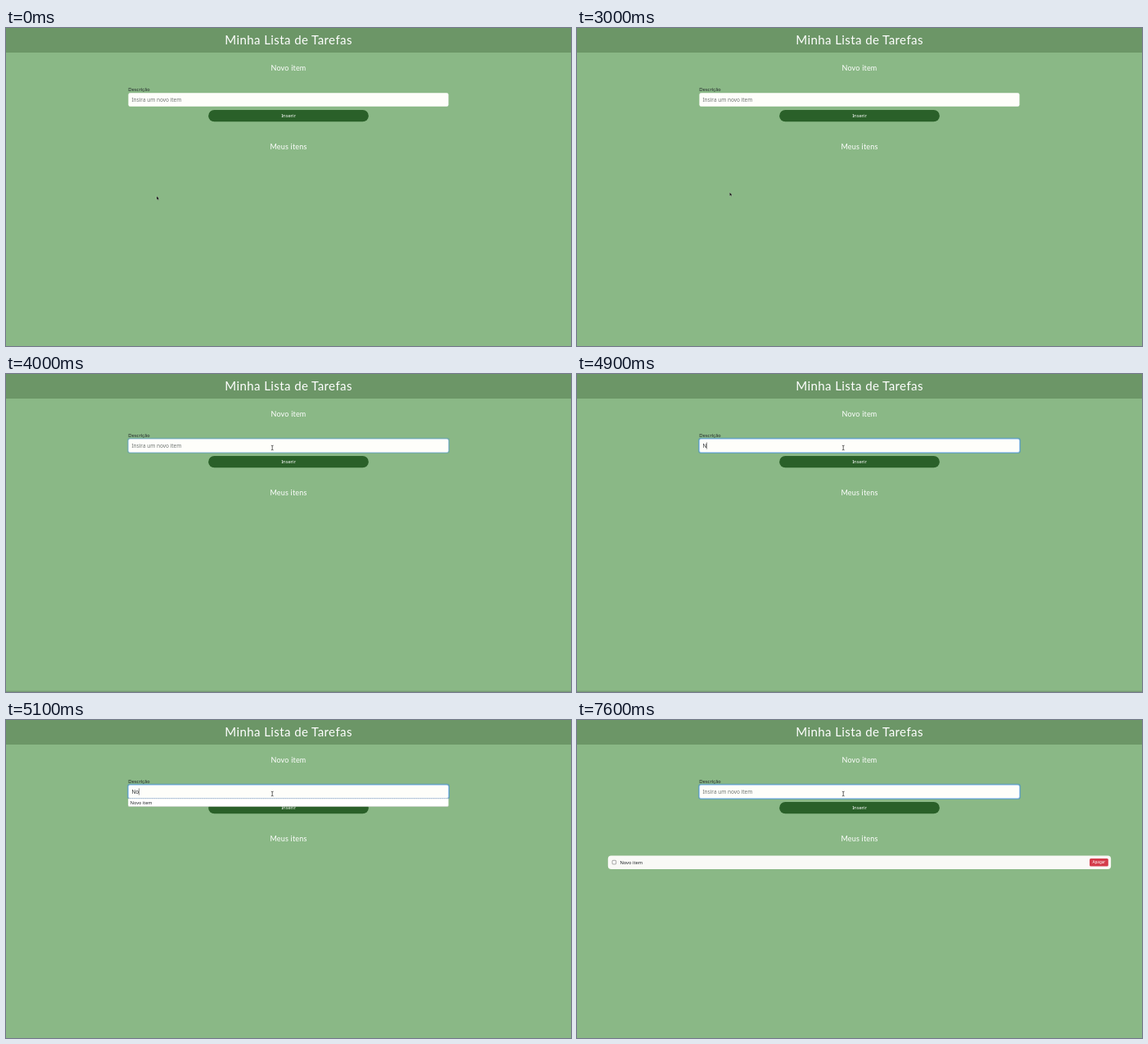
Animation, 690 px wide and 388 px high, one loop 8 s. Source, as an HTML page:

```html
<!DOCTYPE html>
<html lang="pt-BR">
<head>
<meta charset="utf-8">
<title>Minha Lista de Tarefas</title>
<style>
  html, body { margin: 0; width: 100%; height: 100%; overflow: hidden; background: #8ab886; }
  svg { display: block; width: 100%; height: 100%; }
  text { font: 6.47px "Noto Sans", "Open Sans", sans-serif; fill: #212529; }
  .head { font-family: Raleway, Lato, sans-serif; fill: #fff; text-anchor: middle; }
  .title { font-size: 15px; letter-spacing: .42px; }
  .sub { font-size: 9px; letter-spacing: .2px; }
  .label { font: 5.75px Raleway, Lato, sans-serif; letter-spacing: .15px; }
  .body { font-size: 5.75px; }
  .mid { text-anchor: middle; fill: #fff; }
  .hint { fill: #6f7573; }
  .drop { font-size: 5.5px; }
  .small { font-size: 4.6px; }
</style>
</head>
<body>
<svg viewBox="0 0 690 388" preserveAspectRatio="none">
  <rect width="690" height="388" fill="#8ab886"/>
  <rect width="690" height="30" fill="#6c9667"/>
  <text class="head title" x="345" y="20.3">Minha Lista de Tarefas</text>
  <text class="head sub" x="345" y="51.6">Novo item</text>
  <text class="label" x="149.3" y="76.9">Descrição</text>

  <rect id="glow" x="148" y="77.8" width="394" height="19.2" rx="3.4" fill="#0d6efd" fill-opacity=".3"/>
  <rect x="149.4" y="79.2" width="391" height="16.5" rx="2.2" fill="#fefefa"/>
  <rect id="ring" x="149.4" y="79.2" width="391" height="16.5" rx="2.2" fill="none" stroke="#86b7fe" stroke-width=".6"/>
  <text id="hint" class="hint" x="153.4" y="89.7">Insira um novo item</text>
  <text id="typed" x="153.4" y="89.7" xml:space="preserve"></text>
  <rect id="caret" y="83.4" width=".5" height="8.2" fill="#222"/>

  <rect x="247.2" y="100" width="195.6" height="14.3" rx="7.15" fill="#2a6029"/>
  <text class="body mid" x="345" y="109.3">Inserir</text>
  <text class="head sub" x="345" y="148">Meus itens</text>

  <g id="drop">
    <path d="M149.2 95.7H540.4V104.2Q540.4 105.7 538.9 105.7H150.7Q149.2 105.7 149.2 104.2Z" fill="#fff"/>
    <path d="M149.2 95.8H540.4" stroke="#8d8d8d" stroke-width=".5" stroke-dasharray="1 .6"/>
    <path d="M149.4 104.2Q149.4 105.6 150.7 105.6H538.9Q540.2 105.6 540.2 104.2" fill="none" stroke="#9aa39a" stroke-width=".35"/>
    <text class="drop" x="151.8" y="102.7">Novo item</text>
  </g>

  <g id="item">
    <rect x="37.8" y="165.4" width="614.3" height="16.7" rx="4" fill="#f9f9f6"/>
    <rect x="43.1" y="171.3" width="4.6" height="4.6" rx=".8" fill="#fff" stroke="#6b6b6b" stroke-width=".6"/>
    <text class="body" x="52.4" y="175.8">Novo item</text>
    <rect x="626" y="169" width="22.8" height="9.6" rx="1.5" fill="#d43c4b"/>
    <text class="small mid" x="637.4" y="175.4">Apagar</text>
  </g>

  <rect id="edge" y="386.6" width="690" height="1.4" fill="#789a75"/>

  <path id="arrow" d="M0 0V4.6L1.1 3.7L1.8 5.2L2.6 4.9L1.9 3.4H3.2Z" fill="#111" stroke="#e6eee2" stroke-width=".25"/>
  <path id="beam" d="M-1.4 -2.8Q0 -2.8 0 -2V2Q0 2.8 -1.4 2.8M1.4 -2.8Q0 -2.8 0 -2M0 2Q0 2.8 1.4 2.8" fill="none" stroke="#222" stroke-width=".7"/>
</svg>
<script>
  const LOOP = 8000, TICK = 100;
  const el = id => document.getElementById(id);
  const show = (id, on) => el(id).setAttribute("visibility", on ? "visible" : "hidden");

  // [time, x, y] of the pointer
  const moves = [
    [0, 184, 205], [3000, 186.4, 200.4], [3100, 198, 182], [3200, 226, 150],
    [3300, 262, 123], [3400, 286.8, 105.8], [3500, 302, 98], [3600, 314, 93],
    [3700, 322, 91], [3800, 325.2, 90]
  ];
  // [time, text in the field]
  const typing = [
    [0, ""], [4900, "N"], [5000, "No"], [5300, "Nov"], [5500, "Novo"], [5700, "Novo "],
    [6200, "Novo i"], [6400, "Novo it"], [6600, "Novo ite"], [6700, "Novo item"], [7500, ""]
  ];
  const at = (steps, t) => steps.filter(s => s[0] <= t).pop();

  function draw(t) {
    const [, x, y] = at(moves, t);
    const text = at(typing, t)[1];
    const inField = t >= 3600;
    el("arrow").setAttribute("transform", `translate(${x} ${y})`);
    el("beam").setAttribute("transform", `translate(${x} ${y})`);
    show("arrow", !inField);
    show("beam", inField);

    const focus = t < 4000 ? 0 : t < 4100 ? 0.6 : 1;
    el("glow").setAttribute("opacity", focus);
    el("ring").setAttribute("opacity", focus);

    el("typed").textContent = text;
    el("caret").setAttribute("x", 153.6 + (text ? el("typed").getComputedTextLength() : 0));
    show("caret", text);
    show("hint", !text);
    show("drop", t >= 5100 && t < 7500);
    show("item", t >= 7500);
    show("edge", t >= 3200 && t < 5100);
  }

  const start = performance.now();
  let last = -1;
  function frame() {
    const now = (performance.now() - start) % LOOP;
    const t = Math.floor(now / TICK) * TICK;
    if (t !== last) draw(last = t);
    requestAnimationFrame(frame);
  }
  frame();
</script>
</body>
</html>
```
